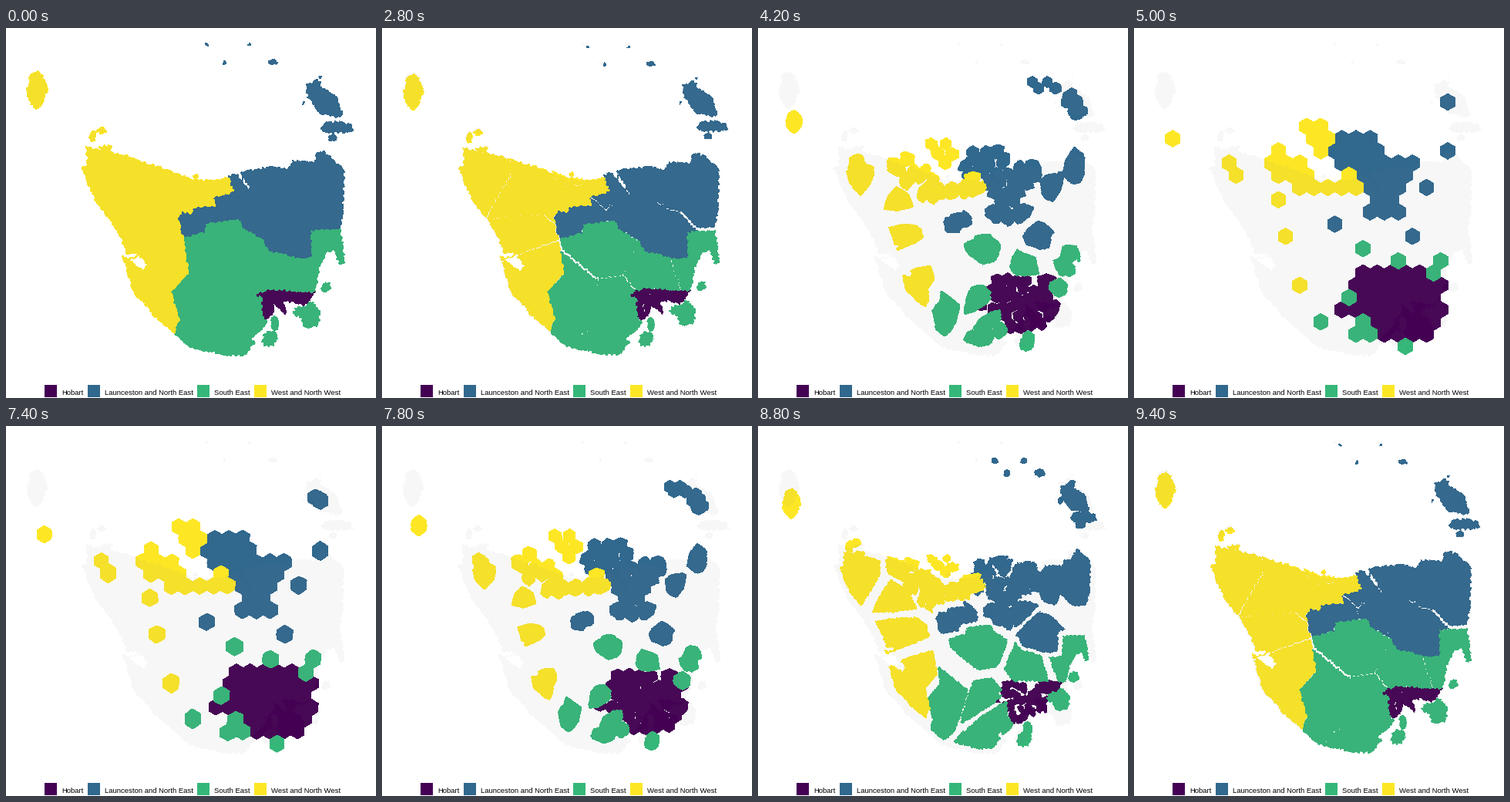
A matplotlib script for the animation above (10 s loop, 480 by 480 pixels).

```python
import random

import matplotlib.pyplot as plt
import numpy as np
from matplotlib.animation import FuncAnimation
from matplotlib.collections import PolyCollection
from matplotlib.patches import PathPatch, Rectangle
from matplotlib.path import Path

SIZE, DPI = 480, 100
PX = 72 / DPI
FRAMES, INTERVAL = 100, 100
N = 180
PURPLE, BLUE, GREEN, YELLOW = "#440154", "#31688E", "#35B779", "#FDE725"

random.seed(11)


# ---------- geometry, points are complex numbers ----------
def line(*xy):
    return [complex(x, y) for x, y in zip(xy[::2], xy[1::2])]


def island(x, y, rx, ry, tilt=0):
    """Uneven ellipse, tilt in degrees."""
    turn = np.exp(1j * np.radians(tilt))
    return [complex(x, y) + turn * random.uniform(0.88, 1.14)
            * complex(rx * np.cos(a), ry * np.sin(a))
            for a in np.arange(14) * 2 * np.pi / 14]


def hex_center(row, col):
    return complex(50.15 + 9.15 * col, 96 + 15.85 * row)


def sample(poly, n):
    """Place n points evenly along a closed outline."""
    z = np.append(poly, poly[0])
    s = np.append(0, np.cumsum(np.abs(np.diff(z))))
    return np.interp(np.arange(n) * s[-1] / n, s, z)


def roughen(poly):
    """Ragged outline; the offset depends on place only, so borders stay shared."""
    z = np.array(poly)
    if (np.conj(z) * np.roll(z, -1)).imag.sum() < 0:
        z = z[::-1]
    length = np.abs(np.diff(np.append(z, z[0]))).sum()
    z = sample(z, max(12, int(length)))
    x, y = z.real, z.imag
    z = z + 1.3 * (np.sin(1.1 * x + 1.9 * np.sin(0.7 * y))
                   + 1j * np.sin(y + 1.9 * np.sin(0.9 * x)))
    return sample(z, N)


def clip(poly, s, o):
    """Part of the polygon nearer to s than to o."""
    def side(z):
        return abs(z - o) ** 2 - abs(z - s) ** 2

    out = []
    for a, b in zip(poly, poly[1:] + poly[:1]):
        da, db = side(a), side(b)
        if da >= 0:
            out.append(a)
        if da * db < 0:
            out.append(a + (b - a) * da / (da - db))
    return out


HEX = sample(10.65 * np.exp(1j * (np.pi / 6 + np.arange(6) * np.pi / 3)), N)
starts, ends, colors = [], [], []


def add(color, row, col, *polys):
    """Every part of an area morphs into the same hexagon."""
    for poly in polys:
        z = roughen(poly)
        fit = np.fft.ifft(np.fft.fft(z) * np.conj(np.fft.fft(HEX))).real
        starts.append(z)
        ends.append(hex_center(row, col) + np.roll(HEX, fit.argmax()))
        colors.append(color)


def towns(rows, x, y, sx, sy, jitter, slope=0):
    """Shrink a patch of hexagons to a loose cluster of seeds around (x, y)."""
    spots = [(row, col) for row, cols in rows.items() for col in cols]
    centers = [hex_center(*spot) for spot in spots]
    mid = sum(centers) / len(centers)
    return [(*spot,
             x + sx * (h - mid).real + random.uniform(-jitter, jitter),
             y + sy * (h - mid).imag + slope * (h - mid).real
             + random.uniform(-jitter, jitter))
            for spot, h in zip(spots, centers)]


def split(color, outline, cells):
    """Cut a region into nearest-seed areas given as (row, col, x, y)."""
    seeds = [complex(x, y) for _, _, x, y in cells]
    for (row, col, x, y), s in zip(cells, seeds):
        area = outline
        for o in seeds:
            if o != s and area:
                area = clip(area, s, o)
        add(color, row, col, area if len(area) > 2 else island(x, y, 2.5, 2.5))


# ---------- coasts and the borders between regions ----------
west_coast = line(288, 194, 272, 199, 240, 197, 200, 181, 180, 176, 155, 166,
                  105, 155, 106, 177, 99, 182, 117, 225, 145, 262, 158, 292,
                  170, 291, 184, 308, 180, 316, 152, 296, 165, 340, 192, 372,
                  218, 395)
north_coast = line(288, 194, 300, 190, 311, 207, 327, 225, 316, 205, 306, 188,
                   323, 184, 345, 181, 365, 183, 373, 173, 400, 175, 404, 163,
                   412, 161, 438, 184, 436, 240, 433, 262)
east_coast = line(433, 262, 439, 303, 433, 307, 427, 287, 415, 290, 407, 306,
                  400, 342)
south_coast = line(331, 374, 338, 382, 326, 395, 316, 402, 322, 408, 308, 424,
                   288, 424, 240, 414, 218, 395)
city_coast = line(400, 342, 388, 359, 358, 352, 363, 371, 353, 362, 347, 355,
                  347, 369, 340, 377, 331, 374)
west_north = line(229, 273, 222, 246, 228, 238, 240, 240, 244, 232, 270, 230,
                  268, 219, 294, 212, 288, 194)
west_south = line(218, 395, 224, 378, 213, 343, 236, 318, 229, 273)
north_south = line(229, 273, 259, 266, 262, 254, 303, 250, 305, 260, 332, 275,
                   340, 290, 386, 301, 398, 298, 397, 264, 433, 262)
city_north = line(400, 342, 340, 338, 320, 347)
city_west = line(331, 374, 331, 350, 320, 347)

city = city_coast + city_west + city_north[::-1]
north = north_coast + north_south[::-1] + west_north
south = (north_south + east_coast + city_north + city_west[::-1]
         + south_coast + west_south)
west = west_coast + west_south + west_north

# ---------- areas ----------
split(PURPLE, city, [(14, 35, 380, 348)] + towns(
    {14: range(27, 34, 2), 15: range(26, 39, 2), 16: range(27, 38, 2),
     17: range(24, 39, 2), 18: range(29, 38, 2), 19: range(30, 37, 2)},
    342, 354, 0.2, 0.22, 5))

split(BLUE, north, [(10, 23, 268, 243), (11, 34, 360, 268),
                    (7, 36, 383, 200), (4, 39, 418, 213)] + towns(
    {3: range(24, 29, 2), 4: range(23, 30, 2), 5: range(24, 35, 2),
     6: range(27, 34, 2), 7: range(28, 33, 2), 8: (29, 31),
     9: range(28, 33, 2)},
    315, 214, 0.45, 0.45, 4))
add(BLUE, 0, 39,
    island(413, 95, 29, 13, 42), island(402, 74, 6, 6),
    island(428, 129, 21, 6), island(424, 142, 5, 3),
    island(346, 44, 4, 2), island(261, 22, 1, 1), island(315, 22, 1, 1),
    island(284, 45, 1, 1), island(386, 97, 1, 2), island(407, 63, 1, 1))

split(GREEN, south, [(12, 27, 288, 292), (13, 32, 352, 318),
                     (13, 38, 402, 300), (16, 25, 300, 356),
                     (18, 21, 250, 340), (18, 27, 314, 376),
                     (19, 26, 318, 405), (19, 28, 331, 388)])
add(GREEN, 13, 38, island(415, 336, 5, 5))
add(GREEN, 14, 37, island(395, 373, 12, 15), island(381, 368, 7, 5))
add(GREEN, 20, 33, island(349, 383, 4, 8), island(342, 404, 10, 8, -40))

split(YELLOW, west, [(6, 9, 138, 195), (8, 15, 178, 218),
                     (11, 16, 182, 270), (15, 18, 196, 308)] + towns(
    {2: (19, 21), 3: (20, 22), 4: (15, 21), 5: range(14, 19, 2),
     6: (15, 17, 19, 25), 7: range(18, 27, 2)},
    233, 203, 0.75, 0.2, 4, 0.13))
add(YELLOW, 3, 0, island(40, 80, 12, 24))
add(YELLOW, 5, 8, island(132, 169, 4, 4))
add(YELLOW, 6, 9, island(124, 133, 5, 3), island(112, 140, 3, 6),
    island(129, 156, 7, 3))

starts, ends = np.array(starts), np.array(ends)

# ---------- figure ----------
fig = plt.figure(figsize=(SIZE / DPI, SIZE / DPI), dpi=DPI, facecolor="white")
ax = fig.add_axes([0, 0, 1, 1])
ax.set_xlim(0, SIZE)
ax.set_ylim(SIZE, 0)
ax.axis("off")

areas = PolyCollection([], facecolors=colors, linewidths=PX,
                       antialiaseds=False, zorder=2)
ax.add_collection(areas, autolim=False)

# faint shade of the whole island over everything
land = Path.make_compound_path(*[
    Path(np.column_stack([z.real, z.imag])[np.r_[0:N, 0]], closed=True)
    for z in starts])
ax.add_patch(PathPatch(land, facecolor="0.5", alpha=0.062, linewidth=0,
                       antialiased=False, zorder=3))

for x, color, label in [(50, PURPLE, "Hobart"),
                        (106, BLUE, "Launceston and North East"),
                        (248, GREEN, "South East"),
                        (322, YELLOW, "West and North West")]:
    ax.add_patch(Rectangle((x, 463), 16, 16, facecolor=color, linewidth=0))
    ax.text(x + 22, 476, label, family="Liberation Sans", size=9.45 * PX,
            color="black", va="baseline")


def progress(i):
    """0 is the map, 1 is the hexagon grid."""
    if i < 28:
        return 0.0
    if i <= 73:
        return min(1.0, (i - 27) / 23)
    return 1 - min(i - 73, 21) / 22


def draw(i):
    t = progress(i)
    z = starts + (ends - starts) * t
    areas.set_verts(np.stack([z.real, z.imag], axis=-1))
    # thin edges close the seams only while the map is whole
    areas.set_edgecolor("none" if t else colors)
    return [areas]


anim = FuncAnimation(fig, draw, frames=FRAMES, interval=INTERVAL,
                     repeat=True, repeat_delay=0)
plt.show()
```
